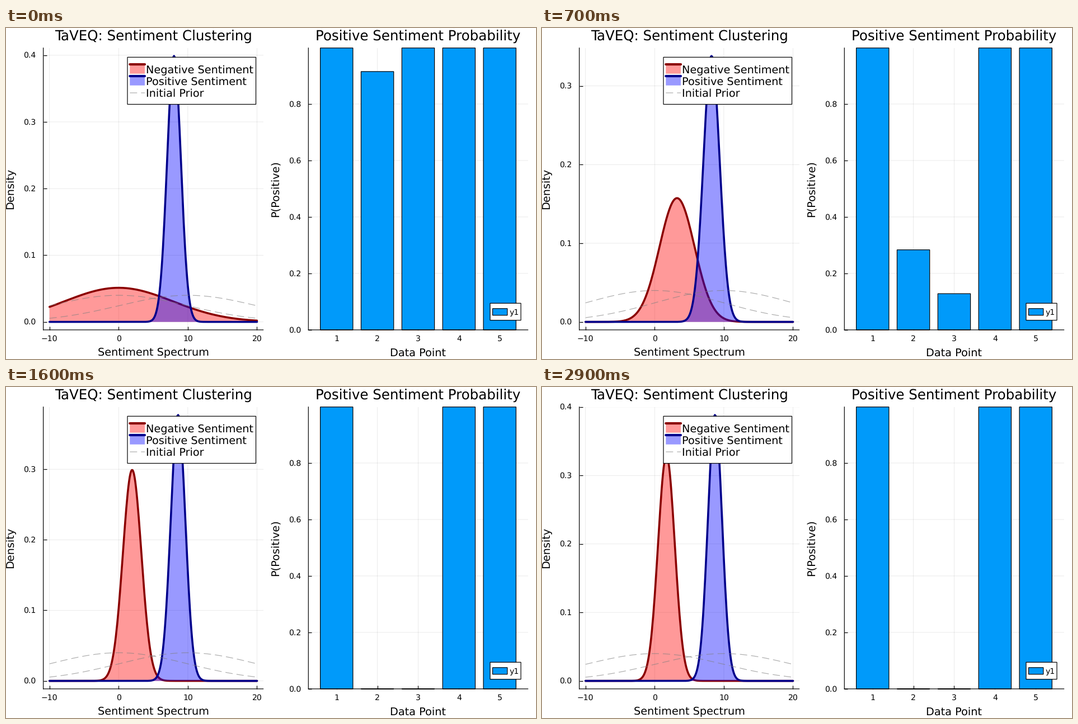
Write a matplotlib script that moves like this. It is 947 px wide and 592 px high and loops after 3 s.

```python
import numpy as np
import matplotlib.pyplot as plt
from matplotlib.animation import FuncAnimation
from matplotlib.patches import Rectangle

W, H, DPI = 947, 592, 64
FRAMES, INTERVAL = 30, 100
PT = 72 / DPI  # points per pixel
TITLE, LABEL, SMALL = 24.55 * PT, 19.3 * PT, 14.04 * PT
THIN, THICK = 1.2 * PT, 3.6 * PT
DASH = (0, (13 / 1.2, 7 / 1.2))
PRIOR = dict(color="gray", alpha=0.65, linewidth=THIN, linestyle=DASH,
             dash_capstyle="butt")
BAR_BLUE = "#009afa"
TOP = 0.9985

plt.rcParams.update({"font.family": "DejaVu Sans", "text.hinting": "none",
                     "path.snap": False})


def smooth(x, xs, ys):
    """Monotone cubic through the given points."""
    xs, ys = np.asarray(xs, float), np.asarray(ys, float)
    h = np.diff(xs)
    d = np.diff(ys) / h
    m = np.r_[d[0], np.zeros(len(d) - 1), d[-1]]
    for k in range(1, len(d)):
        if d[k - 1] * d[k] > 0:
            m[k] = 2 * d[k - 1] * d[k] / (d[k - 1] + d[k])
    k = min(np.searchsorted(xs, x, side="right") - 1, len(d) - 1)
    t = (x - xs[k]) / h[k]
    return ((1 + 2 * t) * (1 - t) ** 2 * ys[k] + t * (1 - t) ** 2 * h[k] * m[k]
            + t * t * (3 - 2 * t) * ys[k + 1] + t * t * (t - 1) * h[k] * m[k + 1])


def normal(x, mean, sd):
    return np.exp(-0.5 * ((x - mean) / sd) ** 2) / (sd * np.sqrt(2 * np.pi))


# Cluster estimates at a few iterations
STEPS = [0, 5, 9, 13, 20, 24, 29]
NEG_MEAN = [0, 3.6, 2.68, 2.04, 1.87, 1.79, 1.70]
NEG_SD = [7.8, 2.97, 2.216, 1.512, 1.225, 1.217, 1.212]
POS_MEAN = [8.0, 8.1, 8.37, 8.56, 8.61, 8.66, 8.72]
POS_SD = [1.0, 1.2155, 1.126, 1.056, 1.0613, 1.053, 1.027]

# Log-odds of the two uncertain points
ODDS_STEPS = [0, 5, 9, 13, 29]
ODDS = {1: [2.376, 0.052, -2.16, -7, -12], 2: [6.5, -0.52, -3.26, -8, -12]}


def estimate(i, means, sds):
    return smooth(i, STEPS, means), np.exp(smooth(i, STEPS, np.log(sds)))


fig = plt.figure(figsize=(W / DPI, H / DPI), dpi=DPI, facecolor="white")


def panel(x0, x1, ticks, y0=35.7, y1=539.9):
    """Axes with inward ticks; returns them with their y labels."""
    ax = fig.add_axes([x0 / W, 1 - y1 / H, (x1 - x0) / W, (y1 - y0) / H])
    ax.set_axisbelow(True)
    ax.spines[["top", "right"]].set_visible(False)
    ax.spines[["left", "bottom"]].set_linewidth(THIN)
    ax.tick_params(direction="in", length=6 * PT, width=THIN, labelsize=SMALL)
    ax.tick_params(axis="x", pad=9.6 * PT)
    ax.tick_params(axis="y", labelleft=False)
    ax.grid(True, color="black", alpha=0.1, linewidth=0.8 * PT)
    ax.set_yticks(ticks)
    labels = [ax.annotate(f"{t:.1f}", (0, t), xycoords=ax.get_yaxis_transform(),
                          xytext=(-13.4 * PT, -4.4 * PT),
                          textcoords="offset points", fontsize=SMALL,
                          ha="right", va="baseline") for t in ticks]
    return ax, labels


# Density panel
DENSITIES = [0, 0.1, 0.2, 0.3, 0.4]
left, density_labels = panel(66.6, 459.6, DENSITIES)
left.set_xlim(-10.9, 20.9)
left.set_xticks([-10, 0, 10, 20])
xs = np.linspace(-10, 20, 301)


def cluster(fill, edge, z):
    area, = left.fill(xs, 0 * xs, color=fill, alpha=0.4, linewidth=0, zorder=z)
    line, = left.plot(xs, 0 * xs, color=edge, linewidth=THICK, zorder=z + 1,
                      solid_capstyle="round", solid_joinstyle="round")
    return area, line


negative = cluster("red", "darkred", 2)
positive = cluster("blue", "darkblue", 4)
for mean in (0, 10):
    left.plot(xs, normal(xs, mean, 10), zorder=6, **PRIOR)

# Probability panel
right, _ = panel(540.3, 932.6, [0, 0.2, 0.4, 0.6, 0.8])
right.set_xlim(0.308, 5.692)
right.set_ylim(0, TOP)
right.set_xticks(range(1, 6))
bars = right.bar(range(1, 6), [TOP] * 5, 0.8, color=BAR_BLUE, edgecolor="black",
                 linewidth=THIN, zorder=2, clip_on=False)

# Titles, labels and legends in pixel coordinates
over = fig.add_axes([0, 0, 1, 1], zorder=5)
over.set_xlim(0, W)
over.set_ylim(H, 0)
over.axis("off")


def write(x, y, text, size, ha="center", **kw):
    over.text(x, y, text, fontsize=size, ha=ha, va="baseline", **kw)


def box(x0, y0, x1, y1, color, edge="black", **kw):
    over.add_patch(Rectangle((x0, y0), x1 - x0, y1 - y0, facecolor=color,
                             edgecolor=edge, linewidth=THIN, **kw))


def vertical(x, y, text):
    write(x, y, text, LABEL, rotation=90, rotation_mode="anchor")


write(263.6, 21.5, "TaVEQ: Sentiment Clustering", TITLE)
write(736, 21.5, "Positive Sentiment Probability", TITLE)
write(263, 586.5, "Sentiment Spectrum", LABEL)
write(736, 586.5, "Data Point", LABEL)
vertical(13, 287.4, "Density")
vertical(486.6, 287.4, "P(Positive)")

box(217, 52.3, 446.5, 136.5, "white")
entries = [("Negative Sentiment", "red", "darkred"),
           ("Positive Sentiment", "blue", "darkblue")]
for row, (name, fill, edge) in enumerate(entries):
    y = 65 + 21 * row
    box(221.3, y, 248, y + 16.7, fill, "none", alpha=0.4)
    over.plot([221.3, 248], [y, y], color=edge, linewidth=4.2 * PT,
              solid_capstyle="round")
    write(250.3, y + 15.7, name, LABEL, "left")
over.plot([221.3, 248], [116, 116], **PRIOR)
write(250.3, 122.7, "Initial Prior", LABEL, "left")

box(865, 492.3, 920, 522.7, "white")
box(869.5, 501.8, 895.8, 513.8, BAR_BLUE)
write(899.5, 513, "y1", SMALL, "left")


def update(i):
    peak = 0
    for (area, line), means, sds in ((negative, NEG_MEAN, NEG_SD),
                                     (positive, POS_MEAN, POS_SD)):
        mean, sd = estimate(i, means, sds)
        ys = normal(xs, mean, sd)
        line.set_ydata(ys)
        area.set_xy(np.column_stack([np.r_[xs[0], xs, xs[-1]], np.r_[0, ys, 0]]))
        peak = max(peak, normal(mean, mean, sd))
    left.set_ylim(-0.03 * peak, 1.03 * peak)
    for t, label in zip(DENSITIES, density_labels):
        label.set_visible(t <= 1.03 * peak)
    for k, odds in ODDS.items():
        p = 1 / (1 + np.exp(-smooth(i, ODDS_STEPS, odds)))
        bars[k].set_height(min(p, TOP))
    return []


anim = FuncAnimation(fig, update, frames=FRAMES, interval=INTERVAL,
                     init_func=lambda: update(0), repeat=True, repeat_delay=0)
plt.show()
```
